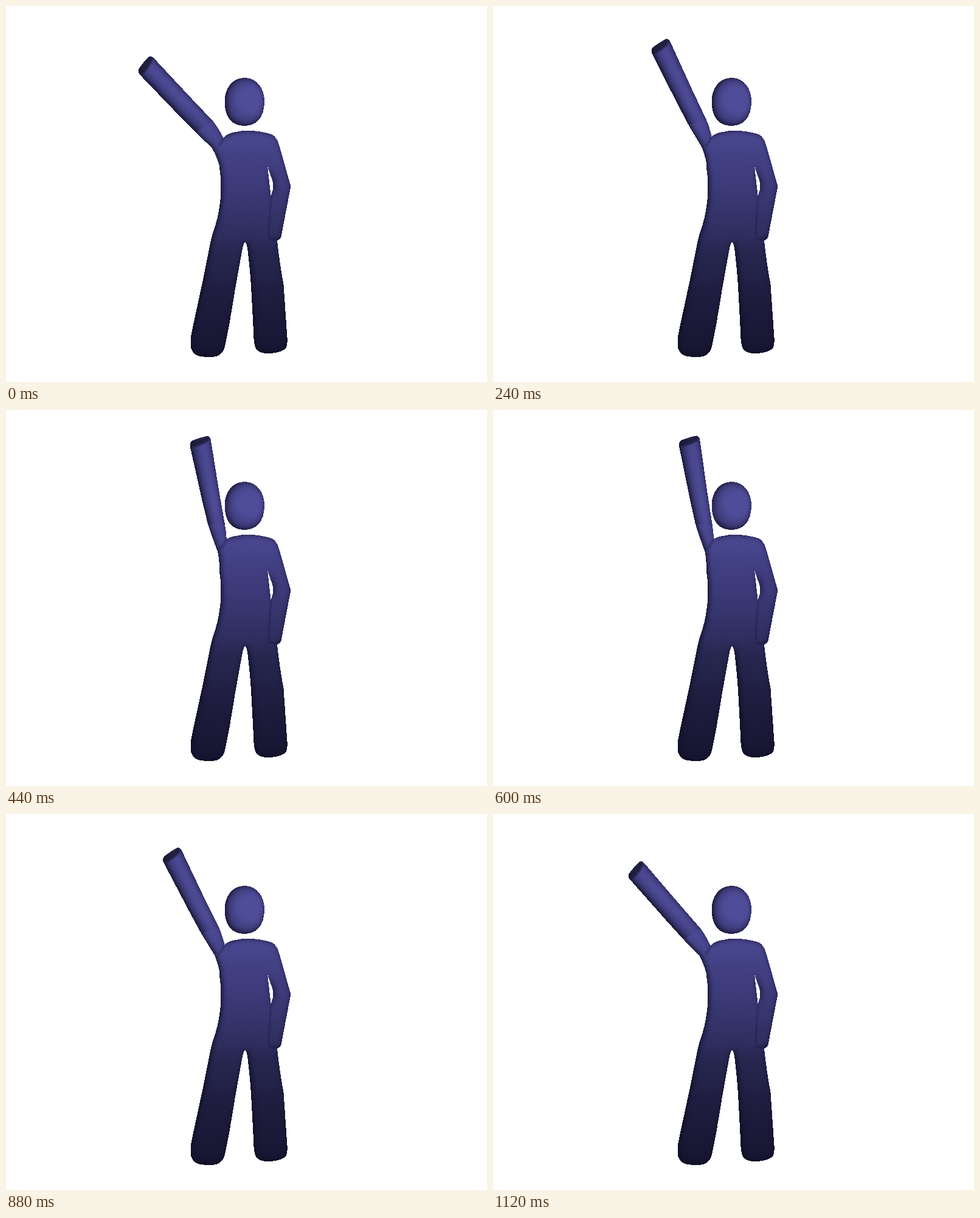
An HTML page that plays this animation: 791 by 618 pixels, repeating every 1.16 s.

```html
<!DOCTYPE html>
<html lang="en">
<head>
<meta charset="utf-8">
<title>Waving figure</title>
<style>
  html, body { margin: 0; width: 100%; height: 100%; overflow: hidden; background: #fff; }
  svg { display: block; }
</style>
</head>
<body>
<svg width="791" height="618" viewBox="0 0 791 618">
  <defs>
    <linearGradient id="skin" gradientUnits="userSpaceOnUse" x1="0" y1="40" x2="0" y2="580">
      <stop offset="0" stop-color="#4b4994"/>
      <stop offset=".22" stop-color="#504e9a"/>
      <stop offset=".36" stop-color="#454389"/>
      <stop offset=".5" stop-color="#3a3874"/>
      <stop offset=".61" stop-color="#302f61"/>
      <stop offset=".68" stop-color="#27264f"/>
      <stop offset=".85" stop-color="#1c1b3b"/>
      <stop offset="1" stop-color="#161530"/>
    </linearGradient>
    <radialGradient id="face" gradientUnits="userSpaceOnUse" cx="401" cy="154" r="48">
      <stop offset="0" stop-color="#504e9a"/>
      <stop offset=".4" stop-color="#4e4c97"/>
      <stop offset="1" stop-color="#35346a"/>
    </radialGradient>
    <linearGradient id="round" gradientUnits="userSpaceOnUse">
      <stop offset="0" stop-color="#0d0c22" stop-opacity=".4"/>
      <stop offset=".5" stop-color="#0d0c22" stop-opacity=".06"/>
      <stop offset=".7" stop-color="#0d0c22" stop-opacity=".04"/>
      <stop offset="1" stop-color="#0d0c22" stop-opacity=".25"/>
    </linearGradient>
    <!-- darkens surfaces that turn away at the outline -->
    <filter id="rim" filterUnits="userSpaceOnUse" x="0" y="0" width="791" height="618" color-interpolation-filters="sRGB">
      <feGaussianBlur in="SourceAlpha" stdDeviation="5"/>
      <feOffset dx="1.5" dy="-1" result="core"/>
      <feFlood flood-color="#0d0c22"/>
      <feComposite in2="core" operator="out"/>
      <feComposite in2="SourceAlpha" operator="in" result="edge"/>
      <feMerge>
        <feMergeNode in="SourceGraphic"/>
        <feMergeNode in="edge"/>
      </feMerge>
    </filter>
    <filter id="soft" filterUnits="userSpaceOnUse" x="0" y="0" width="791" height="618">
      <feGaussianBlur stdDeviation="1.3"/>
    </filter>
  </defs>

  <g fill="url(#skin)" shape-rendering="crispEdges" filter="url(#rim)">
    <path fill="url(#face)" d="M392 118 C414 118 425 137 425 157 C425 183 412 197 392 197 C372 197 359.5 183 359.5 157 C359.5 137 371 118 392 118Z"/>
    <path fill-rule="evenodd" d="M358 216.5 Q362 210.5 375 207.5 Q392 203.5 410 205.5 Q428 207.5 438 211.5 Q446 216.5 449 228
      L459 263 Q463 278 467.5 293 Q468.5 299 466.5 306 L452.5 379 Q451 384 446 385
      Q449.5 420 456.5 458 L462.5 545 Q463.5 559 459 564 Q449 571 430 571 Q416 571 411 563 Q407 555 407 535
      L403 460 Q400.5 425 397 398 Q395 388 393 388 Q390 391 387.5 406 Q376.5 465 367.5 522 L360 560
      Q356 573 346 576 Q334 578 320 576 Q308 574 304.5 563 Q302 550 306 533 L325 445 L337 385
      Q339 375 344 362 Q352 335 353.5 305 Q353.5 280 351 266 L350 232Z
      M430 263 Q432.5 285 435.5 311 Q438 307 439.5 298 Q439.5 289 436 281Z"/>
    <path id="arm"/>
    <path id="shade" fill="url(#round)"/>
  </g>
  <g fill="none" stroke="#15142f" stroke-linecap="round" filter="url(#soft)">
    <path d="M436 313 Q433 345 432 377" stroke-width="2" opacity=".3"/>
    <path d="M433 382 Q442 384 448 382" stroke-width="3" opacity=".5"/>
    <path id="crease" stroke-width="3" opacity=".4"/>
  </g>
  <path id="cap" fill="#131229" opacity=".75" filter="url(#soft)"/>
</svg>
<script>
const STEP = 40, FRAMES = 29, TOP = 13;
const LOW_ANGLE = 46.8, HIGH_ANGLE = 4.2;
const [arm, shade, crease, cap, round] =
  ["arm", "shade", "crease", "cap", "round"].map(id => document.getElementById(id));

const mix = (a, b, k) => a + (b - a) * k;

function swing(frame) {
  const lift = frame <= TOP ? frame / TOP : (FRAMES - frame) / (FRAMES - TOP);
  return mix(LOW_ANGLE, HIGH_ANGLE, lift);
}

function render(ms) {
  const swingAngle = swing(Math.floor(ms / STEP) % FRAMES);
  const low = swingAngle / LOW_ANGLE;
  const axis = (0.93 * swingAngle + 1) * Math.PI / 180;
  const sin = Math.sin(axis), cos = Math.cos(axis);
  const baseX = 352.5 - 0.155 * swingAngle, baseY = 213 + 1.5 * low * low;

  // side: offset across the arm, up: distance from the shoulder
  const point = (side, up) =>
    [baseX + side * cos - up * sin, baseY - side * sin - up * cos];
  const at = (side, up) => point(side, up).map(v => v.toFixed(2)).join(" ");

  const pit = `${351 - 0.265 * swingAngle} 233`;
  const joint = `${mix(365, 357.5, Math.min(1, low * 1.3))} ${mix(210, 216.5, low)}`;
  const left = mix(-14.5, -19, low), right = mix(14.6, 15.3, low);
  const tip = `${at(-18, 158)} Q${at(-18.5, 165)} ${at(-13, 168)}
    Q${at(2, 171)} ${at(13, 171)} Q${at(17.5, 170)} ${at(17.5, 163)}
    L${at(right, 80)} L${at(right - 1, 22)}`;

  arm.setAttribute("d", `M${tip} Q${at(13.5, 10)} ${joint}
    L362 235 L356 290 Q353 258 ${pit}
    Q${at(mix(-9, -18.5, low), 8)} ${at(mix(-12, -19, low), 28)}
    L${at(left, 70)}Z`);

  shade.setAttribute("d", `M${tip} L${at(mix(-12, -19, low), 28)} L${at(left, 70)}Z`);
  const [x1, y1] = point(-18, 90), [x2, y2] = point(17, 90);
  for (const [name, value] of Object.entries({ x1, y1, x2, y2 })) round.setAttribute(name, value);

  cap.setAttribute("d", `M${at(-16, 162)} Q${at(-16, 166)} ${at(-12, 167)}
    Q${at(2, 170)} ${at(13, 170)} Q${at(16, 168)} ${at(14, 164)}
    Q${at(8, 159)} ${at(-4, 158)} Q${at(-15, 157)} ${at(-16, 162)}Z`);

  crease.setAttribute("d", `M${joint} Q${mix(361, 356, low)} 222 351 229`);
}

const start = performance.now();
function tick() {
  render(performance.now() - start);
  requestAnimationFrame(tick);
}
render(0);
requestAnimationFrame(tick);
</script>
</body>
</html>
```
